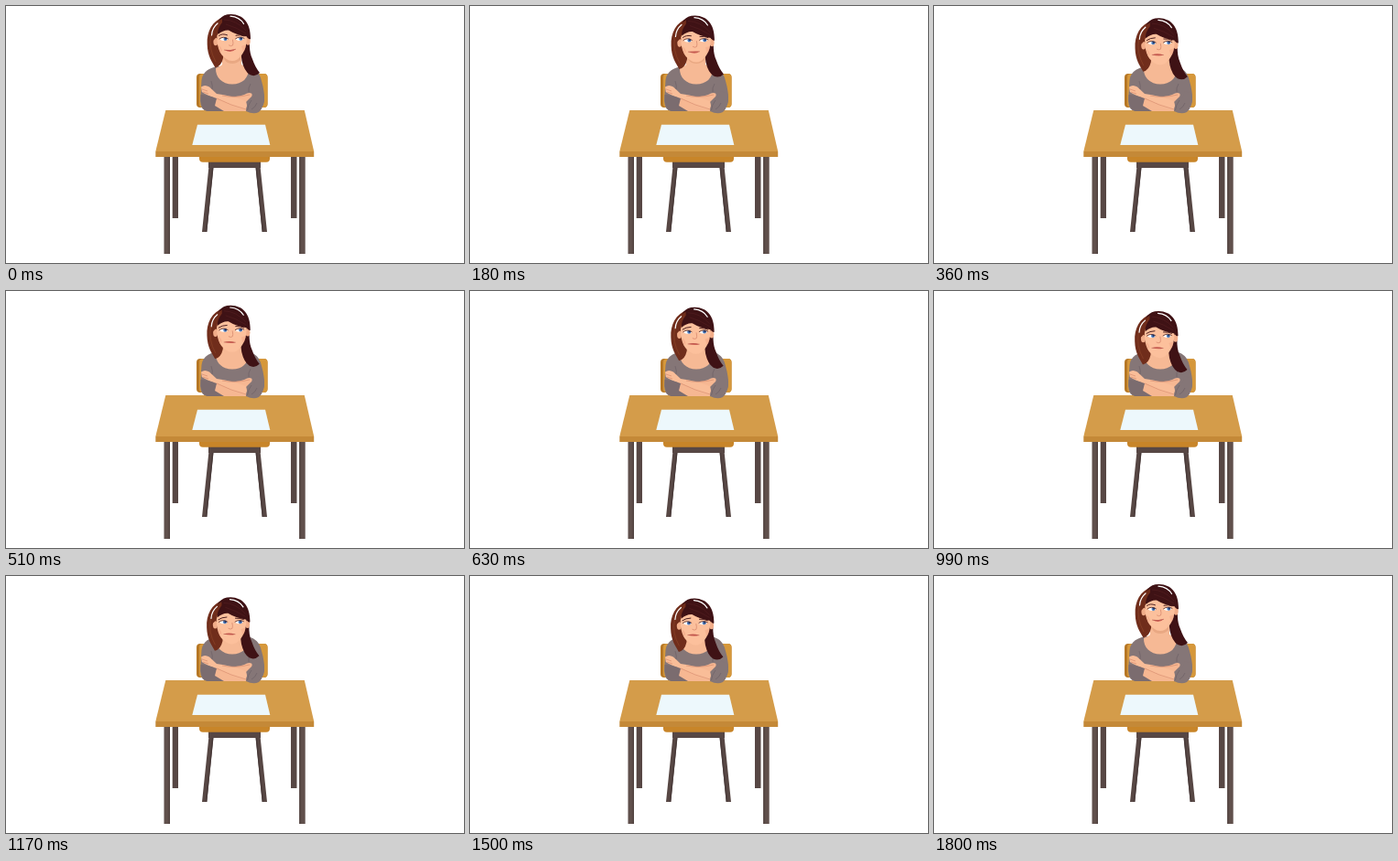
Animation, 500 px wide and 281 px high, one loop 2970 ms. Source, as an HTML page:

```html
<!DOCTYPE html>
<html lang="en">
<head>
<meta charset="utf-8">
<title>Waiting at the desk</title>
<style>
html, body { margin: 0; width: 100%; height: 100%; overflow: hidden; background: #fff; }
svg { display: block; width: 100vw; height: 100vh; }
</style>
</head>
<body>
<svg viewBox="0 0 500 281">
  <!-- chair back -->
  <rect x="208" y="74" width="77.500" height="37" rx="4" fill="#b67725"/>
  <rect x="211" y="74" width="74.500" height="37" rx="4" fill="#d6983b"/>

  <!-- chair seat and legs -->
  <path fill="#574744" d="M221 170H278V177H221Z"/>
  <path fill="#574744" d="M221.500 175H226.500L219.300 247H214ZM272.500 175H277.500L285 247H279.700Z"/>
  <path fill="#483a39" d="M225 177H226.500L219.300 247H218ZM272.500 177H274L281 247H279.700Z"/>
  <path fill="#c88529" d="M211 163H288V167Q288 170.700 284 170.700H215Q211 170.700 211 167Z"/>

  <!-- desk -->
  <path fill="#574744" d="M181.700 164H188V232H181.700ZM311 164H317.500V232H311Z"/>
  <path fill="#60504c" d="M172.500 164H179V271H172.500ZM320.300 164H326.700V271H320.300Z"/>
  <path fill="#4f413e" d="M177.700 164H179V271H177.700ZM320.300 164H321.600V271H320.300Z"/>
  <path fill="#d49c4a" d="M174.300 114H325.800L336.200 159H163.300Z"/>
  <path fill="#c48938" d="M163.300 159H336.200V165H163.300Z"/>
  <path fill="#edf8fc" d="M209 129.700H283L288.300 152H203.300Z"/>

  <!-- body -->
  <path fill="#857677" d="M231 66C222 68 215 71 213.500 81L212 104Q213 115 220 115H271Q281 113 282 104Q282.500 94 279 82C277 72 271 67 262 66Z"/>
  <path fill="#f6b995" d="M235 65L229 68C228.500 78 236 85.500 247 85.500C258 85.500 265 79 265 68L257 64V50H236V64Z"/>
  <path fill="#e9a883" d="M237 54H256V59Q250 65 242 62Q238 60 237 54Z"/>

  <!-- crossed arms -->
  <path fill="#f6b792" d="M227 99Q248 101 260 97Q265 94 268 95.500Q270 98 266 101L262 105L264 115H236Q228 114 225 110Z"/>
  <path fill="#f9bd98" d="M213 88.500Q217 85.500 222 88.500L230 96Q246 98 262 104L264 115Q246 109 230 101Q220 98 213.800 94Z"/>
  <path fill="#7b6c6f" d="M212.500 97Q219 97 230 101L228 109Q233 112 238 115H220Q212 113 212.500 97Z"/>
  <path fill="none" stroke="#d98f70" stroke-width=".7" d="M214 91L220 93M215 94L221 96M230 101Q246 109 262 113M236 98Q250 101 266 97"/>
  <path fill="#857677" d="M281.500 96Q283 110 276 116Q270 119 262 115Q262 108 267 102Q272 101 274 93Z"/>
  <path fill="none" stroke="#6d6066" stroke-width=".7" d="M263.500 114Q264 108 268 103M274 106Q272 111 268 113M224 82Q226 88 225 91M267 85Q264 90 265 94"/>

  <g id="head">
    <path fill="#702d1b" d="M238 12C225 16 219 28 219.700 42C220 55 225 61 228.500 67.500Q235 66 237 57L238 39Z"/>
    <path fill="none" stroke="#8b4429" stroke-width=".7" d="M224 32Q221 47 229 61"/>
    <path fill="#3f1215" d="M255 18L266 29C266 42 265 49 269 58Q272 67 277 73Q272 78 266 75Q260 71 257.500 60L256 48Z"/>
    <ellipse cx="228.900" cy="39" rx="2.500" ry="4.200" fill="#f1ad89"/>
    <ellipse cx="264.200" cy="38.500" rx="2.500" ry="4.200" fill="#f1ad89"/>
    <path fill="#fcc09c" d="M230.500 28Q230 18 246 19Q263 20 263 33C263 45 259 54 252.500 58.500Q246 62 240 57.500C233 53 229.500 44 230.500 28Z"/>
    <path fill="#f4aa8b" opacity=".6" d="M231.500 43Q235 44 236 48Q235 51 234 50ZM257 44Q261 42 262 43Q261 49 259 50Z"/>

    <!-- eyes -->
    <g fill="#fff">
      <path d="M233.500 36.500Q237 32.500 242.500 36.500Q238 39.500 233.500 36.500Z"/>
      <path d="M250.500 36.500Q255 32.500 259.500 36Q255 39.500 250.500 36.500Z"/>
    </g>
    <g fill="#4779bd">
      <circle cx="239.500" cy="36" r="2"/><circle cx="256.300" cy="35.800" r="2"/>
    </g>
    <g fill="#222b51">
      <circle cx="240" cy="35.700" r=".9"/><circle cx="256.800" cy="35.500" r=".9"/>
    </g>
    <path fill="none" stroke="#492322" stroke-width=".8" d="M232.700 36.200Q237 32.500 242.700 36M250.300 36Q255 32.500 260.300 35.500"/>
    <g fill="none" stroke="#4d2020" stroke-width="1" stroke-linecap="round">
      <path id="browL"/><path id="browR"/>
    </g>
    <path fill="none" stroke="#dc9074" stroke-width=".9" stroke-linecap="round" d="M247.500 37Q248.500 41 247.500 43Q245.500 44.500 243.500 43"/>
    <path id="mouth" fill="#d4675a"/>
    <path id="lip" fill="none" stroke="#a3443e" stroke-width=".5"/>

    <!-- fringe and band -->
    <path fill="#3f1215" d="M230.500 28C229 16 235 8.700 246 9C259 9.500 267 18 267 36Q265 37 263 33.500Q251 31.500 243 26.500Q237 26 231.500 31Z"/>
    <path fill="#702d1b" d="M236 14Q225 19 224.500 39Q229 36 231 31Q231 24 236 18Z"/>
    <path fill="none" stroke="#5b2324" stroke-width=".5" d="M240 20Q251 23 262 30M238 15Q251 15 262 27"/>
    <path fill="none" stroke="#fff" stroke-width="1.200" stroke-linecap="round" d="M245 11.200Q255 12 259.500 19.500M231 19Q225 24 224.500 32"/>
  </g>
</svg>
<script>
const LOOP = 2970, STEP = 30, SINK = 1620, RISE = 180, DEPTH = 15.5;
const $ = id => document.getElementById(id);
const head = $("head"), browL = $("browL"), browR = $("browR"), mouth = $("mouth"), lip = $("lip");
const clamp = x => Math.max(0, Math.min(1, x));
const smooth = x => x * x * (3 - 2 * x);
const mix = (a, b, k) => (a + (b - a) * k).toFixed(2);

// Solve a CSS-style cubic curve by bisection.
function bezier(x, x1, y1, x2, y2) {
  const at = (s, a, b) => 3 * s * (1 - s) ** 2 * a + 3 * s * s * (1 - s) * b + s ** 3;
  let lo = 0, hi = 1;
  for (let i = 0; i < 24; i++) {
    const mid = (lo + hi) / 2;
    if (at(mid, x1, x2) < x) lo = mid; else hi = mid;
  }
  return at(lo, y1, y2);
}

function draw(t) {
  const back = 1 - smooth(clamp((t - SINK) / RISE));
  const drop = bezier(clamp(t / SINK), .27, .12, .4, 1) * back;
  const sad = smooth(clamp(t / 360)) * back;
  const m = (a, b) => mix(a, b, sad);

  head.setAttribute("transform", `translate(${mix(0, -.6, drop)} ${mix(0, DEPTH, drop)})`);
  browL.setAttribute("d", `M232.500 ${m(32.5, 33.3)}Q236 ${m(29.5, 30.8)} 241.500 ${m(31.8, 30.6)}`);
  browR.setAttribute("d", `M251 ${m(32.3, 31.8)}Q256 ${m(30.8, 31.4)} 260 ${m(32.8, 33.2)}`);
  const left = m(48, 49.2), right = m(47.2, 49.4);
  mouth.setAttribute("d", `M238.500 ${left}Q244 ${m(48.4, 47)} 250.500 ${right}Q246 ${m(52.5, 51.2)} 238.500 ${left}Z`);
  lip.setAttribute("d", `M238 ${left}Q244 ${m(49.8, 48.6)} 251 ${right}`);
}

const start = performance.now();
function tick() {
  const t = (performance.now() - start) % LOOP;
  draw(Math.floor(t / STEP) * STEP);
  requestAnimationFrame(tick);
}
tick();
</script>
</body>
</html>
```
